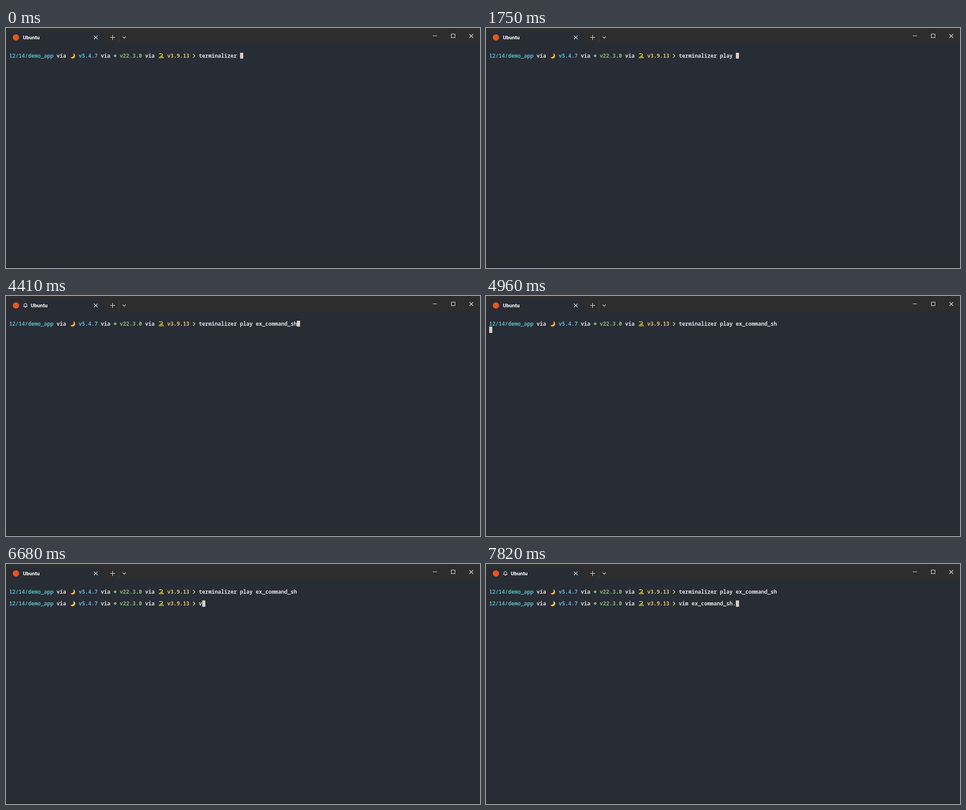
An HTML page that plays this animation: 1051x533 px, repeating every 8 s.

```html
<!DOCTYPE html>
<html lang="en">
<head>
<meta charset="utf-8">
<title>Terminal</title>
<style>
  html, body { margin: 0; width: 100%; height: 100%; overflow: hidden; background: #282c34; }
  svg { display: block; }
  text { white-space: pre; }
  .mono { font: 600 11.69px "Noto Sans Mono", "DejaVu Sans Mono", monospace; fill: #dcdfe4; font-variant-ligatures: none; }
  .label { font: 700 11.5px Roboto, "Open Sans", sans-serif; fill: #fff; }
  .icon { fill: none; stroke: #f0f0f0; stroke-width: 1.1; }
</style>
</head>
<body>
<svg width="1051" height="533" viewBox="0 0 1051 533">
  <rect width="1051" height="533" fill="#282c34"/>
  <rect width="1051" height="34" fill="#2d2d2d"/>
  <path d="M3 34Q7 34 7 30V14Q7 7 14 7H211Q218 7 218 14V30Q218 34 222 34Z" fill="#282c34"/>
  <rect y="532" width="1051" height="1" fill="#1d2026"/>
  <circle cx="22" cy="21" r="7" fill="#e95420"/>
  <path id="bell" class="icon" d="M39 23.5H47L46 21.5V19.5A3 3 0 0 0 40 19.5V21.5ZM41.7 24.2A1.4 1.4 0 0 0 44.3 24.2"/>
  <text id="title" class="label" y="25">Ubuntu</text>
  <path class="icon" d="M195 17L203 25M203 17L195 25"/>
  <path class="icon" stroke-width="1.3" d="M231 21H242M236.5 15.5V26.5"/>
  <path d="M250.5 11V32" stroke="#424242"/>
  <path class="icon" d="M258.5 19.2L262 22.7L265.5 19.2"/>
  <path class="icon" d="M946.5 17.5H955.5M987.5 13.5H995.5V21.5H987.5ZM1027.5 13.5L1036 22M1036 13.5L1027.5 22"/>
  <g id="rows"></g>
  <rect id="cursor" width="7" fill="#d6d1c9"/>
</svg>
<script>
const $ = id => document.getElementById(id);
const LOOP = 8000, CELL = 7.01, PROMPT = 60;
const cellX = n => 7 + n * CELL;

const words = [
  [0, "12/14/demo_app", "#56b6c2"], [15, "via"], [22, "v5.4.7", "#5fb3d9"],
  [29, "via"], [35, "v22.3.0", "#8fb878"], [43, "via"], [50, "v3.9.13", "#d8c26e"]
];

function promptRow(id, dy, moon, snake, arrow) {
  const texts = words.map(([n, s, color = "#dcdfe4"]) =>
    `<text class="mono" x="${cellX(n)}" y="66" style="fill:${color}">${s}</text>`).join("");
  return `<g id="${id}" transform="translate(0 ${dy})">${texts}
    <path d="M148.5 56A5.9 5.9 0 1 1 142.2 64.5A5.4 5.4 0 0 0 148.5 56Z" fill="${moon}"/>
    <path d="M242 58.2L245.6 61.8L242 65.4L238.4 61.8Z" fill="#8fb878"/>
    <circle cx="242" cy="61.8" r=".8" fill="#4b5c4a"/>
    <g fill="none" stroke="${snake}" stroke-width="1.8" stroke-linecap="round">
      <path d="M340 57.3H345.5Q349 59.3 345.5 61.4L342 63.4H347.5M339.5 66.2H349"/>
    </g>
    <path d="M415 57.8L418.6 62L415 66.2" fill="none" stroke="${arrow}" stroke-width="2"/>
    <text class="mono" x="${cellX(PROMPT)}" y="66"></text></g>`;
}
$("rows").innerHTML = promptRow("first", 0, "#f3b544", "#cfc23a", "#98c379")
  + promptRow("second", 26, "#ecd04e", "#c0c93a", "#b5c46c");

const commands = ["terminalizer play ex_command_sh.", "vim ex_command_sh."];
// [time, characters shown]
const typing = [
  [[0, 13], [990, 14], [1190, 15], [1260, 16], [1470, 17], [1750, 18],
   [2480, 19], [2680, 20], [2880, 32], [4410, 31]],
  [[5890, 0], [6490, 1], [6690, 2], [6830, 3], [7090, 4], [7350, 5], [7550, 6], [7820, 18]]
];
const lengthAt = (keys, t) => keys.reduce((n, [at, count]) => t >= at ? count : n, 0);

function draw(t) {
  const counts = typing.map(keys => lengthAt(keys, t));
  ["first", "second"].forEach((id, i) => {
    $(id).lastElementChild.textContent = commands[i].slice(0, counts[i]);
  });
  const row = t < 4690 ? 0 : t < 5890 ? 1 : 2;
  $("second").style.display = row === 2 ? "" : "none";

  const column = row === 1 ? 0 : PROMPT + counts[row / 2];
  $("cursor").setAttribute("x", Math.round(cellX(column)));
  $("cursor").setAttribute("y", [55, 68, 81][row]);
  $("cursor").setAttribute("height", row ? 14 : 13);

  const ringing = (t >= 2950 && t < 4960) || t >= 7820;
  $("bell").style.display = ringing ? "" : "none";
  $("title").setAttribute("x", ringing ? 55 : 37.5);
}

const start = performance.now();
function tick() {
  draw((performance.now() - start) % LOOP);
  requestAnimationFrame(tick);
}
tick();
</script>
</body>
</html>
```
